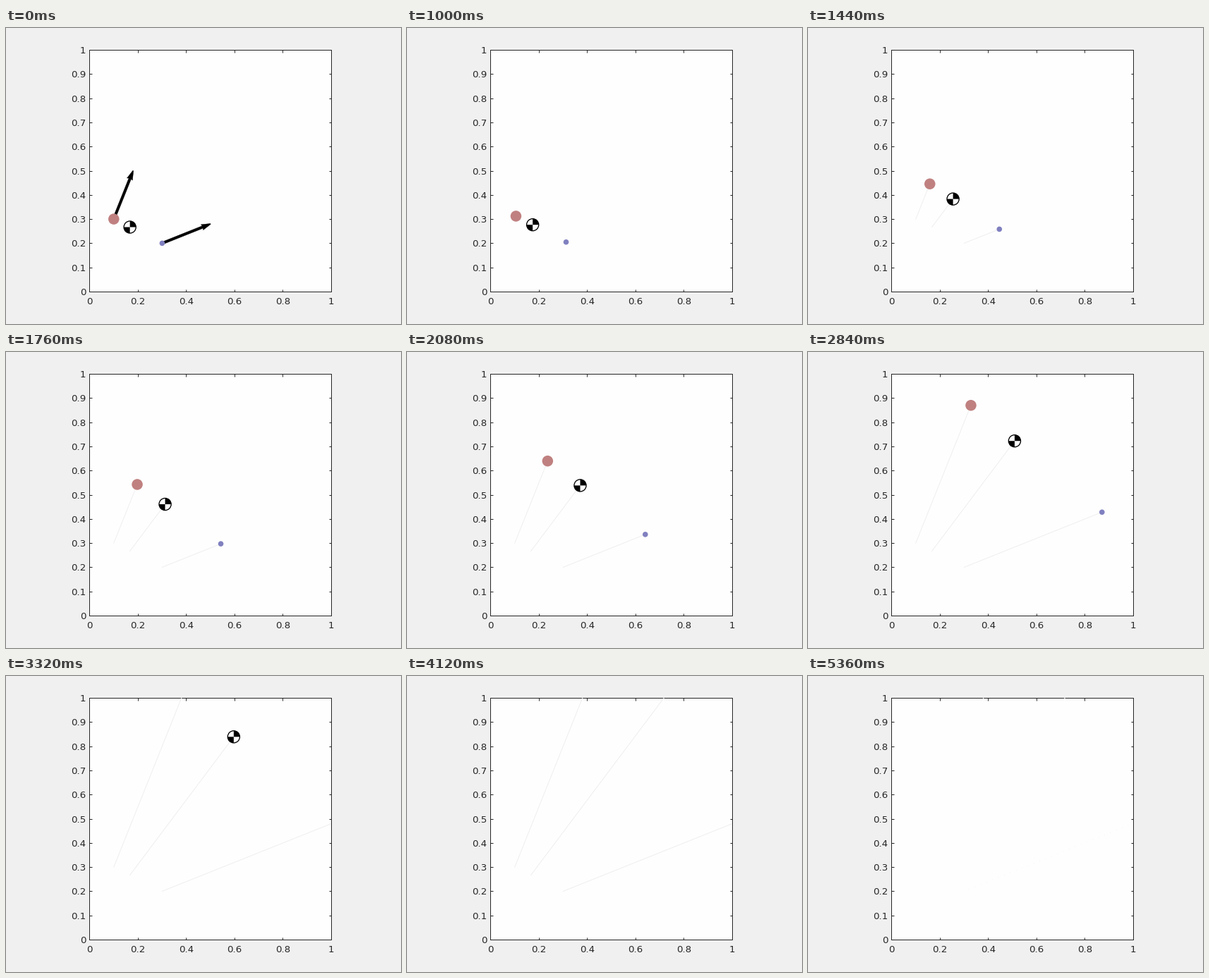
These frames come from a looping animation (560 by 420 pixels, 5600 ms). A matplotlib script:

```python
import numpy as np
import matplotlib.pyplot as plt
from matplotlib.animation import FuncAnimation
from matplotlib.patches import Circle, Polygon, Wedge
from matplotlib.transforms import Affine2D

W, H, DPI = 560, 420, 100
SIDE = 343                      # plot width and height in pixels
PX = 72 / DPI                   # one pixel in points
FRAMES, INTERVAL = 140, 40
START, FADE = 24, 134           # first moving frame, frame where trails fade
STEPS = np.linspace(0, 6, 100)
INK = "#262626"
PAPER = "#fefefe"
TRAIL = "#efefef"

MASS = np.array([2, 1])
POS = np.array([[0.1, 0.3], [0.3, 0.2]])
VEL = np.array([[0.08, 0.2], [0.2, 0.08]])
STARTS = np.vstack([POS, MASS @ POS / MASS.sum()])
SPEEDS = np.vstack([VEL, MASS @ VEL / MASS.sum()])

plt.rcParams["font.family"] = "DejaVu Sans"
fig = plt.figure(figsize=(W / DPI, H / DPI), dpi=DPI, facecolor="#f0f0f0")
ax = fig.add_axes([118 / W, 46 / H, SIDE / W, SIDE / H], facecolor=PAPER)
ax.set(xlim=(0, 1), ylim=(0, 1))

# The frame snaps to pixel centres; shapes need the same half pixel.
SHAPES = Affine2D().translate(0.5, 0)


def setup_axes():
    for spine in ax.spines.values():
        spine.set(linewidth=PX, color=INK)
    for axis, count, pad in ((ax.xaxis, 6, 7.5), (ax.yaxis, 11, 4.5)):
        ticks = np.linspace(0, 1, count)
        axis.set_ticks(ticks, [f"{v:g}" for v in ticks])
        axis.set_tick_params(direction="in", length=3.5 * PX, width=PX,
                             pad=pad * PX, labelsize=9.6,
                             color=INK, labelcolor=INK)
    ax.tick_params(top=True, right=True)


def add_shape(patch):
    patch.set_transform(ax.transData + SHAPES)
    return ax.add_patch(patch)


def make_arrow(start, vec):
    """Solid arrow with a slim head, sized in pixels."""
    length = np.hypot(*vec)
    along = vec / length
    side = np.array([-along[1], along[0]])
    tip = length * SIDE
    half = [(0, 1.8), (tip - 12, 1.8), (tip - 13, 4.2), (tip, 0.5)]
    outline = half + [(a, -b) for a, b in reversed(half)]
    points = [start + (a * along + b * side) / SIDE for a, b in outline]
    return add_shape(Polygon(points, color="black", linewidth=0.3, zorder=4))


def make_ball(pixels, color):
    return add_shape(Circle((0, 0), pixels / 2 / SIDE, facecolor=color,
                            edgecolor="none", clip_on=False, zorder=5))


def make_center(radius=0.025):
    rim = Circle((0, 0), radius, facecolor="white", edgecolor="black",
                 linewidth=1.3 * PX, zorder=6)
    wedges = [Wedge((0, 0), radius, a, a + 90, facecolor="black",
                    edgecolor="none", zorder=7) for a in (0, 180)]
    return [add_shape(p) for p in [rim] + wedges]


setup_axes()
arrows = [make_arrow(p, v) for p, v in zip(POS, VEL)]
balls = [make_ball(15.5, "#c08080"), make_ball(7.6, "#8080c0")]
center = make_center()
trails = [ax.plot([], [], color=TRAIL, linewidth=PX, zorder=3,
                  transform=ax.transData + SHAPES)[0] for _ in STARTS]
dots, = ax.plot([0.32, 0.98], [0.208, 0.472], color="#f5f5f5", linewidth=PX,
                linestyle=(0, (1, 8)), zorder=3.5)


def update(frame):
    step = min(max(frame - START, 0), len(STEPS) - 1)
    now = STARTS + SPEEDS * STEPS[step]
    faded = frame >= FADE

    for arrow in arrows:
        arrow.set_visible(frame < START)
    for ball, p in zip(balls, now):
        ball.set_center(p)
        ball.set_visible(p.max() <= 1)
    for part in center:
        part.set_center(now[2])
    for trail, a, b in zip(trails, STARTS, now):
        trail.set_data([a[0], b[0]], [a[1], b[1]])
        trail.set_color(PAPER if faded else TRAIL)
    dots.set_visible(faded)
    return arrows + balls + center + trails + [dots]


anim = FuncAnimation(fig, update, frames=FRAMES, interval=INTERVAL,
                     repeat=True, repeat_delay=0, blit=False)
plt.show()
```
